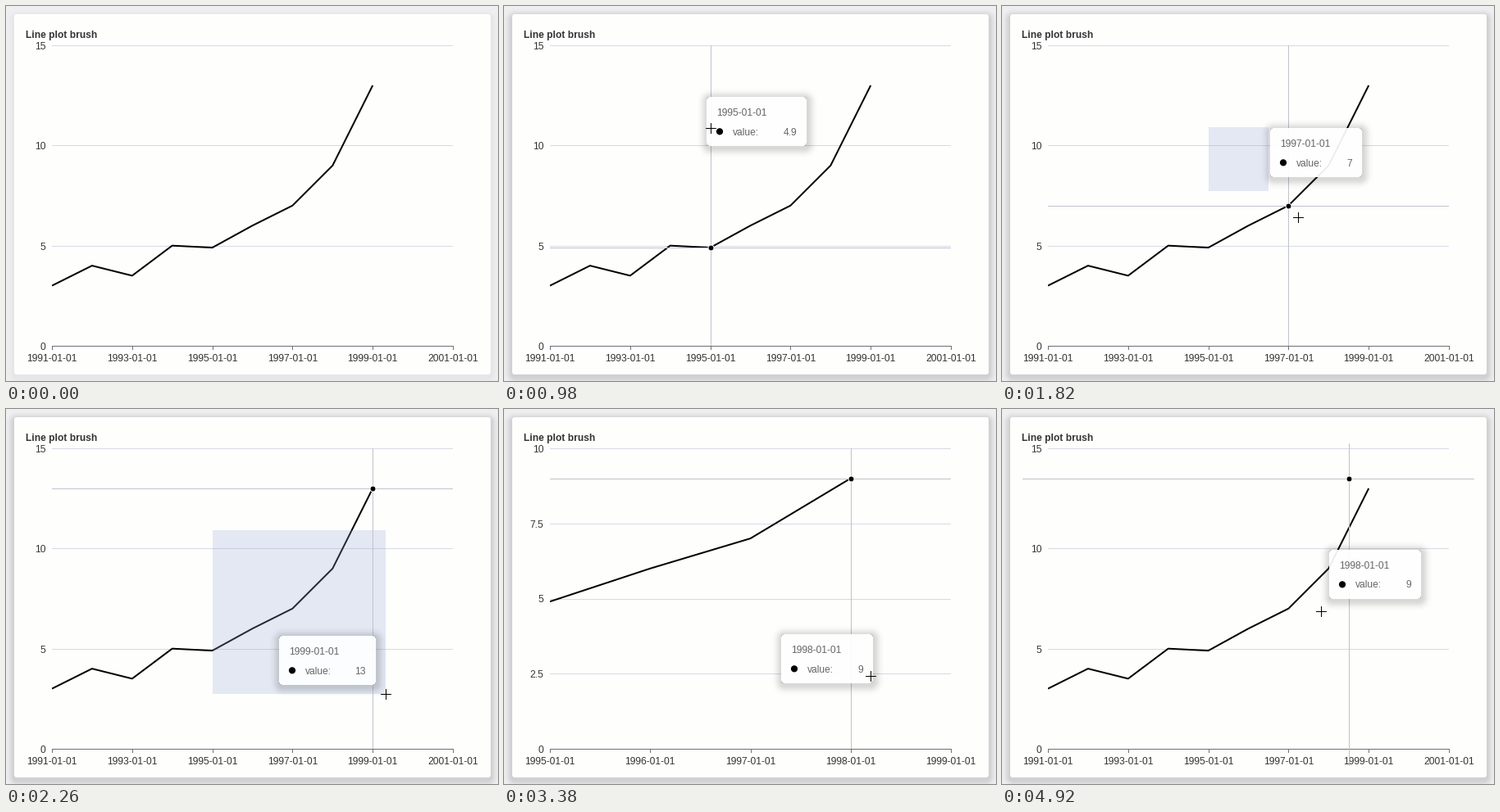
Recreate the animation shown at these times as a matplotlib script. Size 600 by 458 pixels, loop 4940 ms.

```python
import numpy as np
import matplotlib.pyplot as plt
from matplotlib.animation import FuncAnimation
from matplotlib.patches import Circle, Rectangle

W, H, DPI = 600, 458, 100
LOOP, STEP = 4940, 20
PX = 72 / DPI
LEFT, RIGHT, TOP, BOTTOM = 56, 545, 48, 415
OUTER = (25, 576, 42, 436)

VALUES = np.array([3, 4, 3.5, 5, 4.9, 6, 7, 9, 13])
YEARS = 1991 + np.arange(len(VALUES))

# Each view: first year, last year, top value, year ticks, value ticks
FULL = (1991, 2001, 15, range(1991, 2002, 2), range(0, 16, 5))
ZOOM = (1995, 1999, 10, range(1995, 2000), np.arange(0, 10.1, 2.5))

LIFT, PRESS, ZOOM_IN, WAKE, ZOOM_OUT = 60, 1240, 2480, 3240, 4060

# Cursor moves: leave and arrive times, then the place reached
ENTRY = (330, 470)
CORNER = (252, 148)
MOVES = [
    (240, 560, 211, 238),
    (680, 1000, *CORNER),
    (PRESS, 1420, 276, 183),
    (1520, 2160, 463, 348),
    (2400, ZOOM_IN, 462, 348),
    (WAKE, 3720, 389, 242),
    (4900, 4920, 389, 247),
]


def lerp(a, b, k):
    return a + (b - a) * k


def ease(p):
    p = np.clip(p, 0, 1)
    return p * p * (3 - 2 * p)


def cubic_out(p):
    return 1 - (1 - np.clip(p, 0, 1)) ** 3


def cursor(t):
    x, y = ENTRY
    for leave, arrive, to_x, to_y in MOVES:
        k = ease((t - leave) / (arrive - leave))
        x, y = lerp(x, to_x, k), lerp(y, to_y, k)
    return x, y


def x_of(year, view):
    return LEFT + (year - view[0]) / (view[1] - view[0]) * (RIGHT - LEFT)


def y_of(value, view):
    return BOTTOM - value / view[2] * (BOTTOM - TOP)


def crisp(v):
    return np.floor(v + 0.5) + 0.5


def box_distance(w, h, x0, y0, x1, y1, r):
    """Signed distance of every pixel to a rounded box."""
    y, x = np.mgrid[0:h, 0:w] + 0.5
    qx = abs(x - (x0 + x1) / 2) - (x1 - x0) / 2 + r
    qy = abs(y - (y0 + y1) / 2) - (y1 - y0) / 2 + r
    return np.hypot(np.maximum(qx, 0), np.maximum(qy, 0)) + np.minimum(np.maximum(qx, qy), 0) - r


def falloff(d, reach):
    return np.exp(-(np.maximum(d, 0) / reach) ** 2)


def page(strength):
    shade = strength * falloff(box_distance(W, H, 10, 13, 591, 453, 4), 6)
    img = np.array([240, 240, 243.0]) * (1 - shade[..., None])
    cover = np.clip(0.5 - box_distance(W, H, 10, 10, 591, 450, 3), 0, 1)[..., None]
    return lerp(img, np.array([254, 254, 253.0]), cover)


PAD, TIP_H, GAP = 18, 60, 10


def tip_width(text):
    return round(104.9 + sum(3.33 if c == "." else 6.67 for c in text))


def tip_image(width):
    w, h = width + 2 * PAD, TIP_H + 2 * PAD
    x1, y1 = PAD + width, PAD + TIP_H
    inside = np.clip(0.5 - box_distance(w, h, PAD, PAD, x1, y1, 4), 0, 1)
    glow = 0.15 * falloff(box_distance(w, h, PAD + 1, PAD + 2, x1 + 1, y1 + 2, 4), 7)
    img = np.empty((h, w, 4))
    img[..., :3] = inside[..., None]
    img[..., 3] = lerp(glow, 0.93, inside)
    return img


def tip_place(t, width):
    """The box sits above the cursor, flips at the right edge and trails behind."""
    spots = []
    for lag in range(50, 171, 20):
        x, y = cursor(t - lag)
        flip = x + GAP + width > OUTER[1]
        spots.append((x - GAP - width if flip else x + GAP, y - GAP - TIP_H))
    return np.round(np.mean(spots, axis=0))


plt.rcParams["font.family"] = "Liberation Sans"
fig = plt.figure(figsize=(W / DPI, H / DPI), dpi=DPI)
ax = fig.add_axes([0, 0, 1, 1])
ax.axis("off")

REST, LIFTED = page(0.04), page(0.13)
TIPS = {w: tip_image(w) for w in {tip_width(f"{v:g}") for v in VALUES}}

back = ax.imshow(REST.astype(np.uint8), extent=(0, W, H, 0), aspect="auto", interpolation="nearest")
tip_box = ax.imshow(next(iter(TIPS.values())), extent=(0, 1, 1, 0), aspect="auto",
                    interpolation="nearest", zorder=8)
ax.set_autoscale_on(False)
ax.set_xlim(0, W)
ax.set_ylim(H, 0)


def stroke(color, width=1, z=2):
    return ax.plot([], [], color=color, lw=width * PX, zorder=z, snap=False,
                   solid_capstyle="butt", solid_joinstyle="bevel")[0]


def label(x, y, ha="left", color="#333333", z=3, **kw):
    return ax.text(x, y, "", ha=ha, va="baseline", color=color, fontsize=12 * PX, zorder=z, **kw)


def dot(radius, z, **kw):
    return ax.add_patch(Circle((0, 0), radius, fc="black", zorder=z, **kw))


label(24.5, 39, weight="bold").set_text("Line plot brush")
stroke("#6e7079", z=3).set_data([LEFT, RIGHT + 1], [BOTTOM + 0.5] * 2)

x_ticks = [(stroke("#6e7079", z=3), label(0, 434, "center")) for _ in FULL[3]]
y_ticks = [(stroke("#d8dae6"), label(48.5, 0, "right")) for _ in ZOOM[4]]

curve = stroke("black", 2, 4)
curve.set_clip_path(Rectangle((LEFT, TOP - 1), RIGHT - LEFT, BOTTOM - TOP + 2, transform=ax.transData))
brush = ax.add_patch(Rectangle(CORNER, 0, 0, fc="#96aad7", alpha=0.25, lw=0, zorder=5))

guide_x, guide_y = stroke("#c0c3cd", z=6), stroke("#c0c3cd", z=6)
marker = dot(3.5, 7, ec="white", lw=PX)

tip_dot = dot(4.1, 9, lw=0)
tip_date, tip_name = (label(0, 0, color="#666666", z=9) for _ in range(2))
tip_value = label(0, 0, "right", "#666666", 9)

cross = [stroke("black", z=10) for _ in range(2)]
hover_parts = [guide_x, guide_y, marker, tip_box, tip_dot, tip_date, tip_name, tip_value]


def spots(index, scale, new, old, k):
    """Ticks shared by both views slide, the others appear in place."""
    for v in new[index]:
        end = scale(v, new)
        yield v, lerp(scale(v, old), end, k) if v in old[index] else end


def place_ticks(new, old, k):
    for line, text in x_ticks + y_ticks:
        line.set_data([], [])
        text.set_text("")
    for (line, text), (year, x) in zip(x_ticks, spots(3, x_of, new, old, k)):
        line.set_data([crisp(x)] * 2, [BOTTOM, BOTTOM + 5])
        text.set_x(x)
        text.set_text(f"{year}-01-01")
    for (line, text), (value, y) in zip(y_ticks, spots(4, y_of, new, old, k)):
        if value:
            line.set_data([LEFT, RIGHT], [crisp(y)] * 2)
        text.set_y(y + 4.9)
        text.set_text(f"{value:g}")


def place_hover(t, cx, view, old):
    # After a zoom the guides keep their previous place until the next move
    stale = ZOOM_IN <= t <= WAKE or t >= ZOOM_OUT
    if stale:
        year, view = 1998, old
    else:
        at = view[0] + (cx - LEFT) / (RIGHT - LEFT) * (view[1] - view[0])
        year = min(int(at + 0.5), 1998 if view is ZOOM else 1999)
    value = VALUES[year - YEARS[0]]
    px, py = x_of(year, view), y_of(value, view)
    x0, x1, y0, y1 = OUTER if stale else (LEFT, RIGHT, TOP, BOTTOM)
    guide_x.set_data([crisp(px)] * 2, [y0, y1])
    guide_y.set_data([x0, x1], [crisp(py)] * 2)
    marker.center = crisp(px), crisp(py)

    text = f"{value:g}"
    width = tip_width(text)
    x, y = tip_place(t, width)
    tip_box.set_data(TIPS[width])
    tip_box.set_extent((x - PAD, x + width + PAD, y + TIP_H + PAD, y - PAD))
    tip_dot.center = x + 16, y + 42.3
    for item, dx, dy, words in ((tip_date, 12.5, 23, f"{year}-01-01"),
                                (tip_name, 31.5, 46.5, "value:"),
                                (tip_value, width - 12, 46.5, text)):
        item.set_position((x + dx, y + dy))
        item.set_text(words)


def draw(i):
    t = i * STEP
    zoomed = ZOOM_IN <= t < ZOOM_OUT
    new, old = (ZOOM, FULL) if zoomed else (FULL, ZOOM)
    if t < ZOOM_IN:
        k = 1
    else:
        k = cubic_out((t - ZOOM_IN) / 300 if zoomed else (t - ZOOM_OUT) / 200)

    back.set_data(lerp(REST, LIFTED, np.clip((t - LIFT) / 300, 0, 1)).astype(np.uint8))

    place_ticks(new, old, k)
    part = slice(4, 8) if zoomed else slice(None)
    years, values = YEARS[part], VALUES[part]
    curve.set_data(lerp(x_of(years, old), x_of(years, new), k),
                   lerp(y_of(values, old), y_of(values, new), k))

    cx, cy = np.round(cursor(t))
    cross[0].set_data([cx - 6, cx + 7], [cy + 0.5] * 2)
    cross[1].set_data([cx + 0.5] * 2, [cy - 6, cy + 7])

    # The selection trails the cursor a little
    bx, by = np.round(cursor(t - 85))
    brush.set_visible(PRESS + 85 < t < ZOOM_IN)
    brush.set_width(bx - CORNER[0])
    brush.set_height(by - CORNER[1])

    hovering = cy < BOTTOM
    for item in hover_parts:
        item.set_visible(hovering)
    if hovering:
        place_hover(t, cx, new, old)
    return []


anim = FuncAnimation(fig, draw, frames=LOOP // STEP, interval=STEP, repeat=True, blit=False)
plt.show()
```
